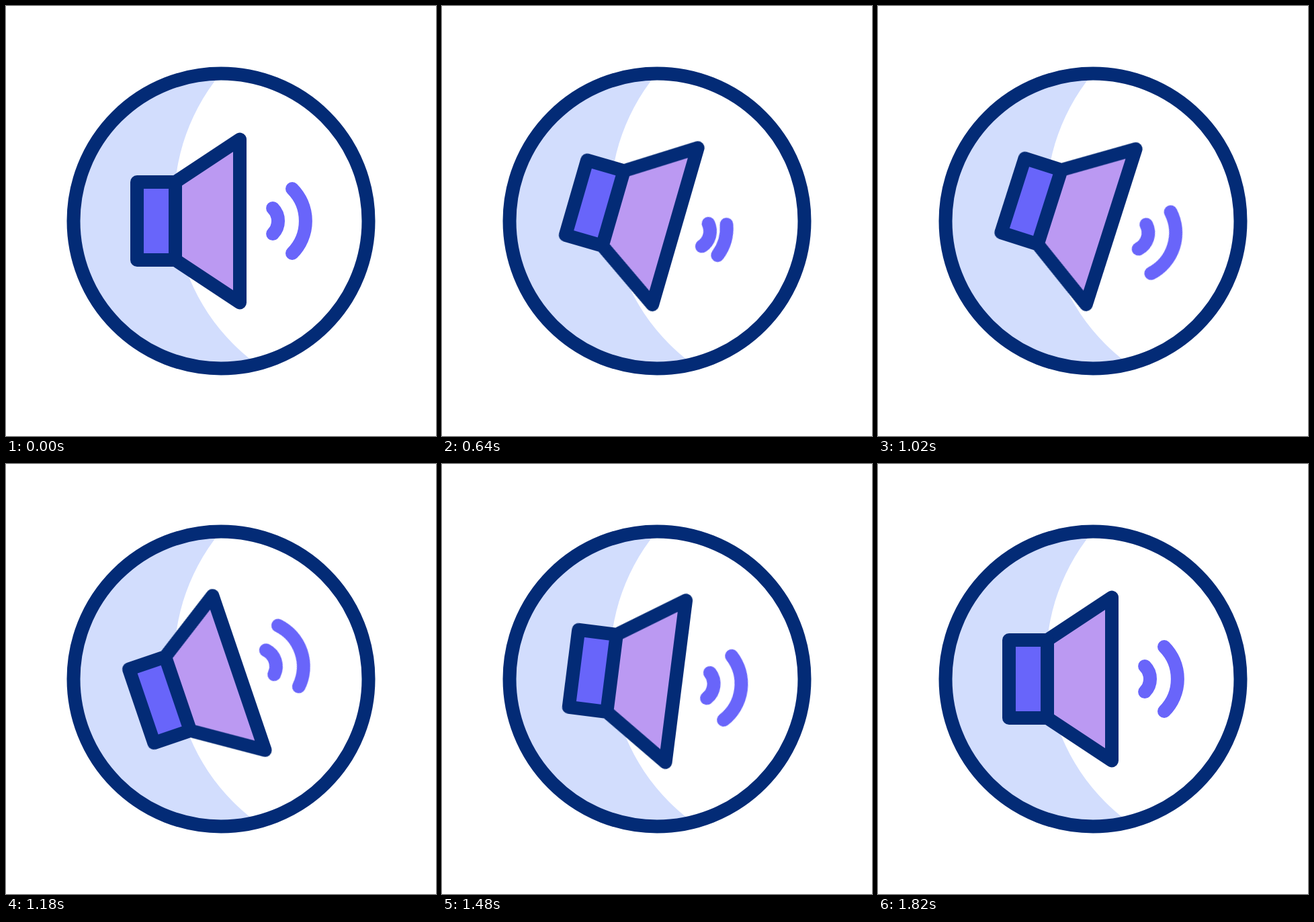
Recreate the animation shown at these times as an HTML page. Size 640 by 640 pixels, loop 2120 ms.

```html
<!DOCTYPE html>
<html lang="en">
<head>
<meta charset="utf-8">
<title>Speaker</title>
<style>
  html, body { margin: 0; width: 100%; height: 100%; overflow: hidden; background: #fff; }
  svg { display: block; width: 100%; height: 100%; }

  .outline { stroke: #032b76; stroke-width: 20; stroke-linejoin: round; }
  .wave {
    fill: none; stroke: #6965fa; stroke-width: 20; stroke-linecap: round;
    stroke-dasharray: 100 200;
  }
  .shake, .wave { animation: 2120ms cubic-bezier(.333, 0, .667, 1) infinite; }
  .shake { transform-origin: 320px 320px; animation-name: shake; }
  .near { animation-name: near; }
  .far { animation-name: far; }

  @keyframes shake {
    0%, 18.87% { transform: rotate(0deg); }
    28.49%, 46.7%, 66.46% { transform: rotate(20deg); }
    37.59%, 56.75%, 75.47% { transform: rotate(-20deg); }
    85.38%, 100% { transform: rotate(0deg); }
  }

  /* Each arc is trimmed toward its middle while sliding to the speaker. */
  @keyframes near {
    0%, 33.02%, 100% { transform: none; stroke-dasharray: 100 200; stroke-dashoffset: 0; opacity: 1; }
    14.62%, 18.87% { transform: translateX(-38px); stroke-dasharray: 0 200; stroke-dashoffset: -50; opacity: 1; }
    14.63%, 18.86% { transform: translateX(-38px); stroke-dasharray: 0 200; stroke-dashoffset: -50; opacity: 0; }
  }
  @keyframes far {
    0%, 37.74%, 100% { transform: none; stroke-dasharray: 100 200; stroke-dashoffset: 0; opacity: 1; }
    14.62%, 23.58% { transform: translateX(-38px); stroke-dasharray: 0 200; stroke-dashoffset: -50; opacity: 1; }
    14.63%, 23.57% { transform: translateX(-38px); stroke-dasharray: 0 200; stroke-dashoffset: -50; opacity: 0; }
  }
</style>
</head>
<body>
<svg viewBox="0 0 640 640">
  <circle cx="320" cy="320" r="219.5" fill="#d2ddfd"/>
  <circle cx="549.6" cy="291.6" r="299" fill="#fff"/>
  <circle class="outline" cx="320" cy="320" r="219.5" fill="none"/>
  <g class="shake">
    <path class="wave near" pathLength="100" d="M397.1 300.9A27 27 0 0 1 397.1 339.1"/>
    <path class="wave far" pathLength="100" d="M426 272A67.9 67.9 0 0 1 426 368"/>
    <path class="outline" fill="#bb99f2" d="M252 262L348 198.5V441.5L252 378Z"/>
    <path class="outline" fill="#6865fa" d="M195 262H252V378H195Z"/>
  </g>
</svg>
</body>
</html>
```
